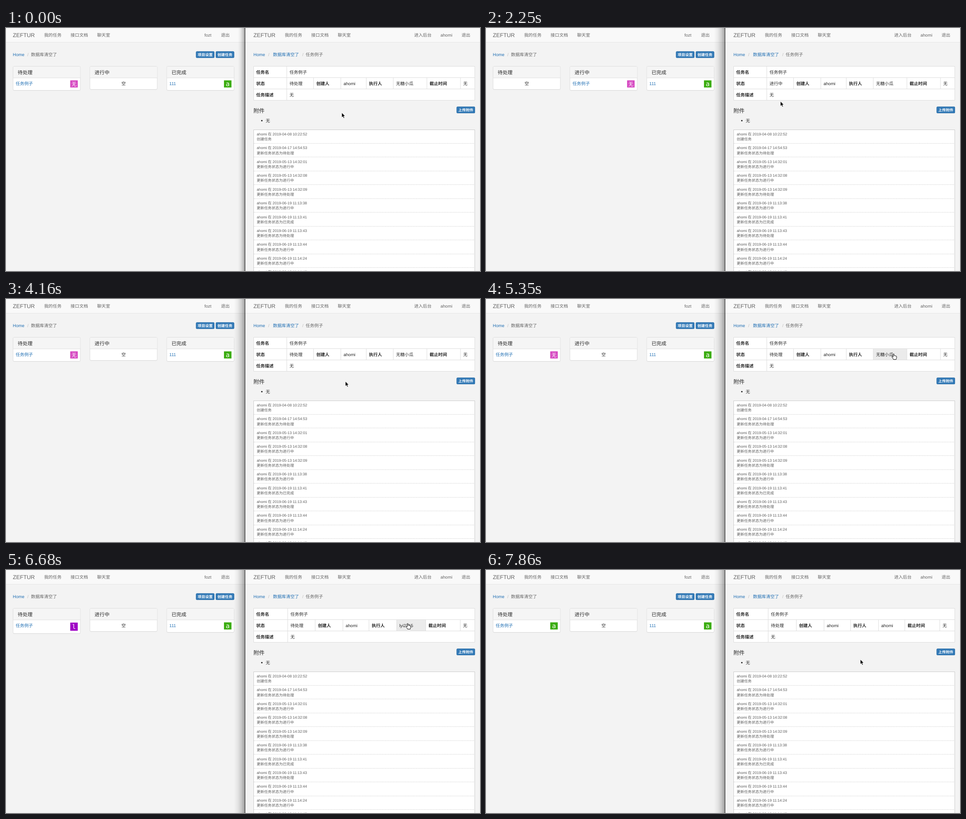
Animation, 1044 px wide and 536 px high, one loop 8000 ms. Source, as an HTML page:

```html
<!DOCTYPE html>
<html lang="zh-CN">
<head>
<meta charset="utf-8">
<title>Task board</title>
<style>
html, body { margin: 0; width: 100%; height: 100%; overflow: hidden; background: #f3f3f3; }
svg { display: block; width: 1044px; height: 536px; }
text { font-family: "Liberation Sans", "Noto Sans CJK SC", "Noto Sans CJK", sans-serif; white-space: pre; text-rendering: geometricPrecision; }
.mono { font-family: "DejaVu Sans Mono", monospace; }
.round { font-family: "DejaVu Sans", sans-serif; }
</style>
</head>
<body>
<svg viewBox="0 0 1044 536">
  <defs>
    <linearGradient id="shade">
      <stop offset="0" stop-color="#000" stop-opacity="0"/>
      <stop offset=".35" stop-color="#000" stop-opacity=".06"/>
      <stop offset=".7" stop-color="#000" stop-opacity=".18"/>
      <stop offset="1" stop-color="#000" stop-opacity=".36"/>
    </linearGradient>
    <filter id="drop" x="-20%" y="-10%" width="140%" height="125%">
      <feDropShadow dx="0" dy="1.5" stdDeviation="1.6" flood-opacity=".28"/>
    </filter>
  </defs>
  <g id="page"></g>
  <g id="board"></g>
  <rect id="shadow" y="0" height="536" fill="url(#shade)"/>
  <path d="M526.5 0V536" stroke="#1c1c1c"/>
  <g id="table"></g>
  <g id="menu"></g>
  <g id="cursor">
    <path id="arrow" d="M.4 .8V11.4L2.9 9.2 4.6 13.1 6.5 12.3 4.8 8.5H8.1Z" fill="#000" stroke="#fff" stroke-width=".8" stroke-linejoin="round"/>
    <path id="hand" d="M-1.3 1.1C-1.3-.4 .9-.4 .9 1.1V4.2C1.2 3.4 2.8 3.5 2.9 4.6 3.4 3.9 4.7 4.1 4.8 5.2 5.5 4.7 6.4 5.1 6.4 6V8.6C6.4 10 5.4 10.7 5.3 12.4H-.6C-.8 10.8-2.6 9.3-3.8 7.2-4.4 6-3.1 5.3-2.2 6.3L-1.3 7.3Z" fill="#fff" stroke="#000" stroke-width=".95" stroke-linejoin="round"/>
  </g>
</svg>
<script>
const LOOP = 8000, BODY = 9.56, SMALL = 8.2, BIG = 12.3;
const BLUE = '#2270b4', GREY = '#646464', INK = '#262626', LINE = '#ddd';
const OWNER = 'ahomi', VIEWER = 'fozt';
const STATES = ['待处理', '进行中', '已完成'];
const PEOPLE = [OWNER, 'lyi2715', '无糖小瓜', VIEWER, 'kov', 'benu', 'suyo', 'wado', 'miru'];

// Who holds the task: name, column lines of the table, badge letter and look
const HOLDERS = [
  { name: PEOPLE[2], cols: [618.5, 677.5, 737.5, 793.5, 853, 927, 1001], badge: ['无', '#d545c0', '', 11.5] },
  { name: PEOPLE[1], cols: [620.5, 681, 742, 799.5, 860.5, 924.5, 1000.5], badge: ['l', '#a002c6', 'mono', 14] },
  { name: OWNER, cols: [621.5, 683.5, 744.5, 803, 864.5, 922.5, 999.5], badge: ['a', '#3aac0e', 'round', 14] }
];

// Pointer moves: start, end, steps, bend x, bend y, goal x, goal y
const MOVES = [
  [600, 1370, 6, 672, 178, 655, 130],
  [1520, 1520, 1, 651, 124, 651, 124],
  [1810, 1950, 2, 649, 142, 648, 161],
  [2400, 2540, 2, 649, 140, 649, 122],
  [3130, 3570, 4, 652, 108, 646, 138],
  [4010, 4160, 2, 700, 165, 747, 181],
  [4460, 5350, 7, 1060, 178, 898, 121],
  [5640, 5940, 3, 892, 142, 888, 163],
  [6380, 6680, 3, 886, 142, 885, 118],
  [7260, 7260, 1, 886, 138, 886, 138],
  [7710, 7860, 2, 860, 165, 824, 196.5]
];

const $ = id => document.getElementById(id);
const between = (t, a, b) => t >= a && t < b;

// Text placed by the middle of its line
function text(s, x, mid, { size = BODY, fill = INK, weight = 400, anchor = 'start', cls = '' } = {}) {
  return `<text x="${x}" y="${mid + size * .37}" font-size="${size}" fill="${fill}" text-anchor="${anchor}"` +
    ` font-weight="${weight}"${cls ? ` class="${cls}"` : ''}>${s}</text>`;
}
const rect = (x, y, w, h, fill, more = '') =>
  `<rect x="${x}" y="${y}" width="${w}" height="${h}" fill="${fill}" ${more}/>`;
const path = (d, stroke = LINE, more = '') => `<path d="${d}" fill="none" stroke="${stroke}" ${more}/>`;

function button(label, x, y) {
  return rect(x, y, 40.5, 14.4, '#337ab7', 'rx="2"') +
    rect(x + .35, y + .35, 39.8, 13.7, 'none', 'rx="1.7" stroke="#2e6da4" stroke-width=".7"') +
    text(label, x + 20.25, y + 7.2, { size: SMALL, fill: '#fff', weight: 700, anchor: 'middle' });
}

function navbar(x, w, items) {
  return rect(x, 0, w, 31.5, '#f9f9f9') + path(`M${x} 31.5h${w}`, '#e5e5e5') +
    items.map(([s, tx], i) => text(s, tx, 15, { size: i ? BODY : BIG, fill: GREY })).join('');
}

function crumbs(items) {
  return items.map(([s, x, fill]) => text(s, x, 58.5, { fill })).join('');
}

function logs() {
  const rows = [
    ['04-08 10:22:52', -1], ['04-17 14:54:53', 0], ['05-13 14:32:01', 1], ['05-13 14:32:08', 1],
    ['05-13 14:32:09', 0], ['06-19 11:13:38', 1], ['06-19 11:13:41', 2], ['06-19 11:13:43', 0],
    ['06-19 11:13:44', 1], ['06-19 11:14:24', 1], ['06-19 11:14:40', 0]
  ];
  const style = { size: SMALL, fill: '#5a5a5a' };
  return rect(545.5, 224.5, 487, 330, '#fff', 'stroke="#ccc"') + rows.map(([when, state], i) => {
    const y = 224 + 30.48 * i;
    const note = state < 0 ? '创建任务' : '更新任务状态为' + STATES[state];
    return text(`${OWNER} 在 2019-${when}`, 552.3, y + 9.6, style) + text(note, 552.3, y + 21, style) +
      path(`M546 ${Math.round(y + 30) + .5}H1032`, '#c8c8c8', 'stroke-dasharray="2 1.4" stroke-width=".8"');
  }).join('');
}

function page() {
  const links = x => [['ZEFTUR', x], ['我的任务', x + 69], ['接口文档', x + 127.3], ['聊天室', x + 185.7]];
  return rect(0, 0, 1044, 536, '#f3f3f3') +
    navbar(0, 527, [...links(15), [VIEWER, 437], ['退出', 473.5]]) +
    navbar(527, 517, [...links(545), ['进入后台', 899], [OWNER, 957], ['退出', 1003.5]]) +
    crumbs([['Home', 15, BLUE], ['/', 47, '#bbb'], ['数据库清空了', 55, GREY],
      ['Home', 545, BLUE], ['/', 577.5, '#bbb'], ['数据库清空了', 588, BLUE], ['/', 652.5, '#bbb'], ['任务例子', 660, GREY]]) +
    button('项目设置', 418.5, 51.6) + button('创建任务', 462, 51.6) + button('上传附件', 992.5, 173.5) +
    text('附件', 545, 182, { size: BIG, weight: 500 }) +
    `<circle cx="563.5" cy="204.3" r="1.6" fill="${INK}"/>` + text('无', 572, 204) + logs();
}

function badge(x, [s, fill, cls, size]) {
  const tall = cls === 'mono';
  return rect(x, tall ? 116 : 115.5, 16.5, tall ? 18 : 15.7, fill) +
    text(s, x + 8.2, tall ? 124.8 : cls ? 122.4 : 123.3, { size, fill: '#fff', cls, anchor: 'middle' });
}

function panel(i, task, mark) {
  const x = 15.5 + 169.3 * i, h = !task ? 51 : mark[2] === 'mono' ? 55.5 : 53;
  return rect(x, 85.5, 148.3, h, '#000', 'rx="2.5" opacity=".06"') +
    rect(x, 84.5, 148.3, h, '#fff', `rx="2.5" stroke="${LINE}"`) +
    rect(x + .5, 85, 147.3, 24.7, '#f5f5f5', 'rx="2"') + path(`M${x} 110h148.3`) +
    text(STATES[i], x + 10.3, 97.9, { size: 10.9, weight: 500 }) +
    (task ? text(task, x + 5.7, 122.7, { fill: BLUE }) + badge(x + 126, mark)
          : text('空', x + 74.2, 122.7, { anchor: 'middle' }));
}

function board(state, holder) {
  return [0, 1].map(i => panel(i, i === state && '任务例子', HOLDERS[holder].badge)).join('') +
    panel(2, '111', HOLDERS[2].badge);
}

function table(state, holder, hover) {
  const { name, cols } = HOLDERS[holder];
  const row = ['状态', STATES[state], '创建人', OWNER, '执行人', name, '截止时间', '无'];
  const lit = hover < 0 ? '' : rect(cols[hover], 109.5, cols[hover + 1] - cols[hover], 25, '#ebebeb');
  const first = cols[0] + 6;
  return rect(545.5, 84.5, 487, 75, '#fff') + lit +
    path('M545.5 84.5h487v75h-487zM545.5 109.5h487M545.5 134.5h487') +
    path(`M${cols[0]} 84.5v75` + cols.slice(1).map(x => `M${x} 109.5v25`).join('')) +
    text('任务名', 551, 97.2, { weight: 700 }) + text('任务例子', first, 97.2) +
    row.map((s, i) => text(s, i ? cols[i - 1] + 6 : 551, 122.2, { weight: i % 2 ? 400 : i < 7 ? 700 : 400 })).join('') +
    text('任务描述', 551, 147.2, { weight: 700 }) + text('无', first, 147.2);
}

function menu(kind, holder, y) {
  if (kind < 0) return '';
  const { cols } = HOLDERS[holder], items = kind ? PEOPLE : STATES;
  const x = cols[kind] + 6, w = cols[kind + 1] - cols[kind], step = 24.4, top = 129;
  const lit = Math.floor((y - top) / step);
  return rect(x, top, w, step * items.length + 1, '#fff', 'rx="1.5" stroke="#c8c8c8" stroke-width=".8" filter="url(#drop)"') +
    items.map((s, i) => {
      const iy = top + step * i;
      return (i === lit ? rect(x + .5, iy + .5, w - 1, step - .5, '#eee') : '') +
        (i ? path(`M${x + .5} ${iy + .3}h${w - 1}`, '#e2e2e2') : '') + text(s, x + 7.4, iy + 12.7);
    }).join('');
}

function pointer(t) {
  let x = 739, y = 186;
  for (const [start, end, n, bx, by, gx, gy] of MOVES) {
    if (t < start) break;
    const k = n === 1 ? 1 : Math.min(n, Math.floor((t - start) / (end - start) * (n - 1) + 1e-6) + 1);
    const p = k / n, u = .5 * p + .25 * (1 - Math.cos(Math.PI * p)), v = 1 - u;
    x = v * v * x + 2 * u * v * bx + u * u * gx;
    y = v * v * y + 2 * u * v * by + u * u * gy;
  }
  return { x, y };
}

const shown = {};
function update(id, make, ...args) {
  const key = args.join();
  if (shown[id] === key) return;
  shown[id] = key;
  $(id).innerHTML = make(...args);
}

function draw(t) {
  const { x, y } = pointer(t);
  const state = between(t, 2250, 3860) ? 1 : 0;
  const holder = t < 6230 ? 0 : t < 7560 ? 1 : 2;
  // Cell 0 opens the states, cell 4 the people
  const open = between(t, 1660, 2250) || between(t, 2990, 3860) ? 0
    : between(t, 5490, 6230) || between(t, 6970, 7560) ? 4 : -1;
  const { cols } = HOLDERS[holder];
  const over = [0, 4].find(c => between(y, 109.5, 134.5) && between(x, cols[c], cols[c + 1]));
  const hover = open >= 0 ? open : over ?? -1;

  update('board', board, state, holder);
  update('table', table, state, holder, hover);
  update('menu', menu, open, holder, open < 0 ? 0 : y);
  const edge = t < 1040 ? 511 : 502;
  $('shadow').setAttribute('x', edge);
  $('shadow').setAttribute('width', 526 - edge);
  $('cursor').setAttribute('transform', `translate(${x} ${y})`);
  $('hand').setAttribute('visibility', hover >= 0 ? 'visible' : 'hidden');
  $('arrow').setAttribute('visibility', hover >= 0 ? 'hidden' : 'visible');
}

$('page').innerHTML = page();
const begin = performance.now();
function tick() {
  draw((performance.now() - begin) % LOOP);
  requestAnimationFrame(tick);
}
tick();
</script>
</body>
</html>
```
